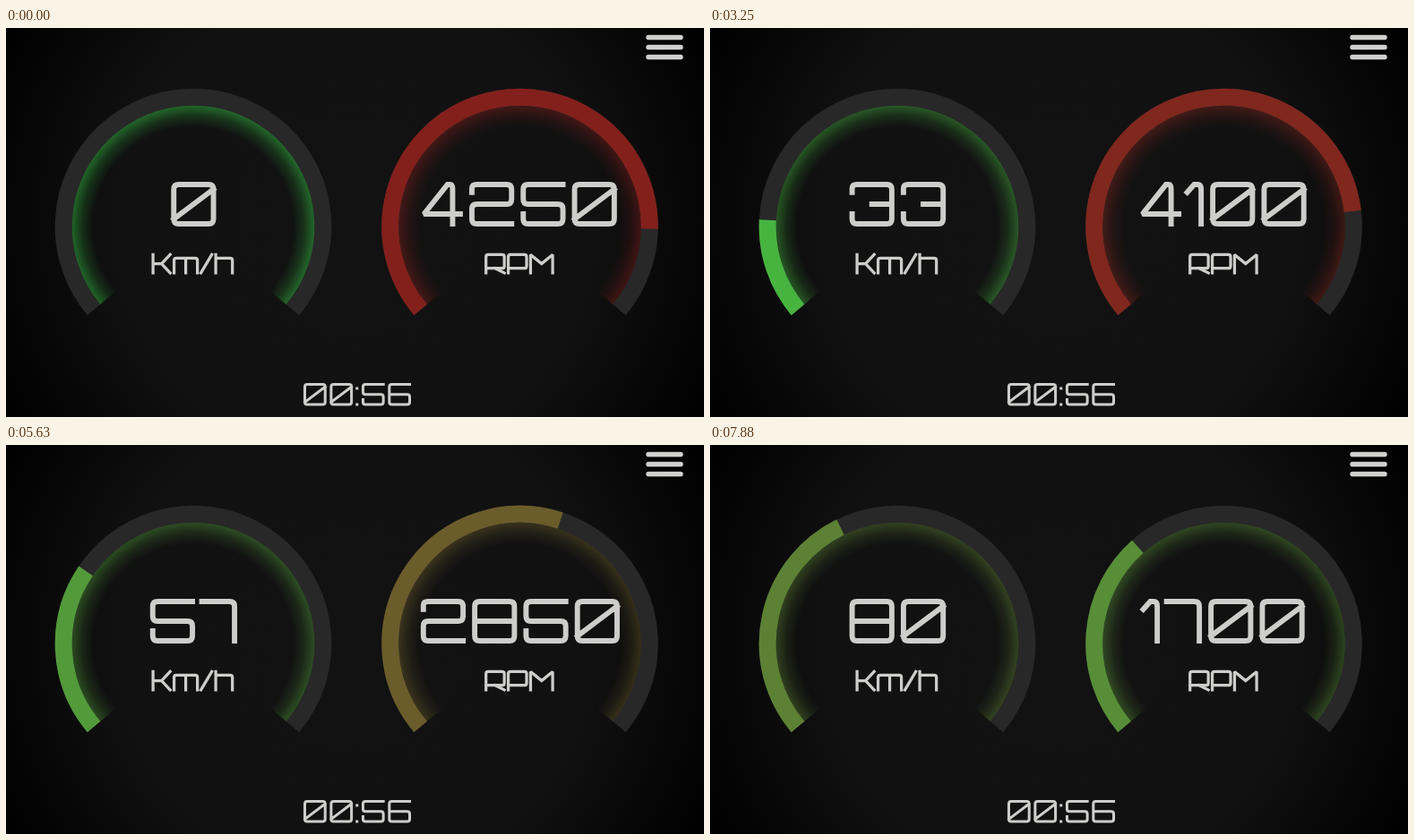
An HTML page for the animation above (8000 ms loop, 779x435 px).

```html
<!DOCTYPE html>
<html lang="en">
<head>
<meta charset="utf-8">
<title>Dashboard</title>
<style>
  html, body { margin: 0; width: 100%; height: 100%; overflow: hidden; background: #000; }
  svg { display: block; width: 779px; height: 435px; }
  .glyphs { fill: none; stroke: #cdcdcb; stroke-linecap: square; stroke-miterlimit: 2; }
</style>
</head>
<body>
<svg id="stage" viewBox="0 0 779 435">
  <defs>
    <radialGradient id="vignette" gradientUnits="userSpaceOnUse" cx="389.5" cy="217.5" r="446">
      <stop offset="0" stop-color="#121212"/>
      <stop offset=".6" stop-color="#111"/>
      <stop offset=".8" stop-color="#080808"/>
      <stop offset="1" stop-color="#000"/>
    </radialGradient>
  </defs>
  <rect width="779" height="435" fill="url(#vignette)"/>
  <path d="M717 10.5h36M717 21.5h36M717 32.5h36" stroke="#d0d0ce" stroke-width="5.4" stroke-linecap="round"/>
</svg>
<script>
const LOOP = 8000, STEP = 125;
const CY = 222, START = 140, SWEEP = 260;
const stage = document.getElementById('stage');

// Letters are walks between named points of a grid that fits each glyph's width
const COLUMNS = [0, 0.5, 0.65, 0.79, 1];
const ROWS = { 0: 'qwpne', 0.12: '----o', 0.2: 'ry--t', 0.5: 'as--d', 0.75: 'fj--b', 0.88: 'g', 1: 'zx-mc' };
const GRID = {};
for (const v in ROWS) [...ROWS[v]].forEach((name, i) => { GRID[name] = [COLUMNS[i], +v]; });

const TOP = 3, HEIGHT = 44, PAD = 6.5, RADIUS = 5.5;
// [walks, left bearing, grid width]
const GLYPHS = {
  0: ['qeczq|go'], 2: ['rqedazc'], 3: ['rqeczf|sd'], 5: ['eqadczf'],
  6: ['eqzcda'], 8: ['qeczq|ad'], 9: ['daqecz'],
  1: ['rwec', 3, 15.5], 4: ['mnpfb', 4, 40.5], 7: ['qec', 4, 36.5],
  ':': ['rr|zz', 5.5, 0], ' ': ['', 5.5, 0],
  K: ['qz|ase|sc', 3, 41], m: ['zrtc|yx', 3, 56], '/': ['ze', 2, 26], h: ['qz|rtc', 3, 40],
  R: ['zqebf|jc', 3, 44], P: ['zqebf', 3, 44], M: ['zqsec', 3, 53]
};

function el(name, attrs, parent = stage) {
  const node = document.createElementNS('http://www.w3.org/2000/svg', name);
  for (const key in attrs) node.setAttribute(key, attrs[key]);
  return parent.appendChild(node);
}

function toward(a, b) {
  const k = Math.min(RADIUS / Math.hypot(b[0] - a[0], b[1] - a[1]), 0.5);
  return [a[0] + (b[0] - a[0]) * k, a[1] + (b[1] - a[1]) * k];
}

const straight = (a, b) => a[0] === b[0] || a[1] === b[1];

// Right angles are rounded, corners with a diagonal stay sharp
function walkPath(walk, left, width) {
  const closed = walk.length > 2 && walk[0] === walk.at(-1);
  const names = closed ? walk.slice(0, -1) : walk;
  const pts = [...names].map(c => [left + GRID[c][0] * width, TOP + GRID[c][1] * HEIGHT]);
  const n = pts.length;
  const d = pts.map((p, i) => {
    const cmd = i ? 'L' : 'M', before = pts[(i + n - 1) % n], after = pts[(i + 1) % n];
    const isEnd = !closed && (i === 0 || i === n - 1);
    if (isEnd || !straight(before, p) || !straight(p, after)) return cmd + p;
    return `${cmd}${toward(p, before)}Q${p} ${toward(p, after)}`;
  });
  return d.join('') + (closed ? 'Z' : '');
}

function label(cx, top, scale, weight = 5.9) {
  const node = el('path', { class: 'glyphs', role: 'img', 'stroke-width': weight });
  return text => {
    let x = 0, d = '';
    for (const ch of text) {
      const [walks, left = PAD, width = 44.3] = GLYPHS[ch];
      if (walks) for (const walk of walks.split('|')) d += walkPath(walk, x + left, width);
      x += left + width + PAD;
    }
    node.setAttribute('d', d);
    node.setAttribute('aria-label', text);
    node.setAttribute('transform', `translate(${cx - x * scale / 2} ${top}) scale(${scale})`);
  };
}

function arc(cx, r, sweep) {
  if (sweep <= 0) return '';
  const at = deg => {
    const a = deg * Math.PI / 180;
    return [cx + r * Math.cos(a), CY + r * Math.sin(a)];
  };
  return `M${at(START)}A${r} ${r} 0 ${+(sweep > 180)} 1 ${at(START + sweep)}`;
}

function gauge(id, cx, max, unit) {
  const gradient = el('radialGradient', { id, gradientUnits: 'userSpaceOnUse', cx, cy: CY, r: 136 });
  const stops = [[0.82, 0], [0.91, 0.17], [1, 0.45]].map(([offset, opacity]) =>
    el('stop', { offset, 'stop-opacity': opacity }, gradient));
  const ring = { fill: 'none', 'stroke-width': 19 };
  el('path', { d: arc(cx, 123.5, SWEEP), fill: 'none', stroke: `url(#${id})`, 'stroke-width': 25 });
  el('path', { ...ring, d: arc(cx, 144.8, SWEEP), stroke: '#282828' });
  const bar = el('path', ring);
  const number = label(cx + 0.4, 172, 1);
  label(cx + 0.2, 252, 0.465, 7)(unit);
  return value => {
    const k = value / max;
    const color = `rgb(${57 + 87 * k},${215 - 215 * k},${73 - 53 * k})`;
    bar.setAttribute('d', arc(cx, 144.8, SWEEP * k));
    bar.setAttribute('stroke', color);
    stops.forEach(stop => stop.setAttribute('stop-color', color));
    number(String(value));
  };
}

const setSpeed = gauge('speedGlow', 209, 200, 'Km/h');
const setRpm = gauge('rpmGlow', 573.5, 5000, 'RPM');
const setClock = label(392, 397, 0.513);

function render(ms) {
  const tick = Math.floor(ms / STEP);
  setSpeed(Math.floor(1.275 * tick));
  // Revs climb to the limit, then fall by the same amount per tick
  setRpm(5000 - 50 * Math.abs(15 - Math.round(1.285 * tick)));
  const colonOn = (tick * STEP + 800) % 2000 < 1000;
  setClock(colonOn ? '00:56' : '00 56');
}

const begin = performance.now();
function loop() {
  render((performance.now() - begin) % LOOP);
  requestAnimationFrame(loop);
}
loop();
</script>
</body>
</html>
```
